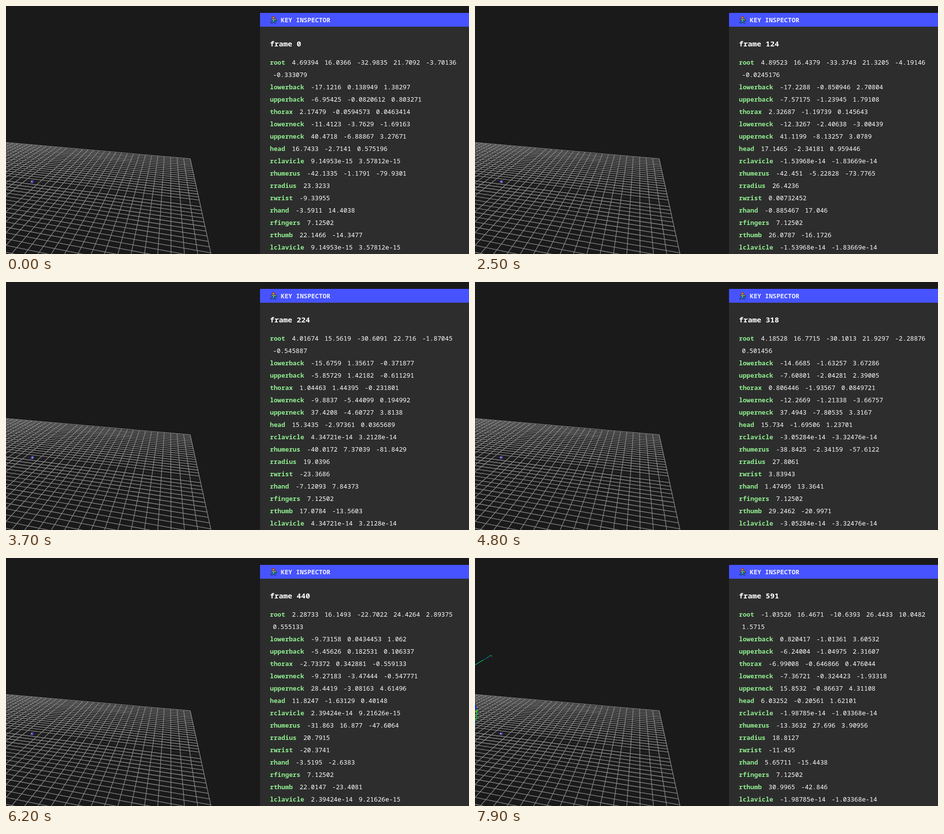
Write an HTML page that moves like this. It is 935x503 px and loops after 8 s.

```html
<!DOCTYPE html>
<html lang="en">
<head>
<meta charset="utf-8">
<title>Key inspector</title>
<style>
  html, body { margin: 0; width: 100%; height: 100%; overflow: hidden; background: #1a1a1a; }
  svg { display: block; width: 935px; height: 503px; }
  text { font-family: "Noto Sans Mono", "DejaVu Sans Mono", monospace; font-size: 12.8px; fill: #fff; }
  .name { font-weight: 700; fill: #90ee90; }
  .title { font-weight: 700; fill: #f0f0ff; }
  #counter { font-size: 15px; font-weight: 600; }
</style>
</head>
<body>
<svg viewBox="0 0 935 503">
  <rect width="935" height="503" fill="#1a1a1a"/>
  <g id="grid" fill="none" stroke-width="1.3"></g>

  <g transform="translate(53 356.3)">
    <circle r="2.7" fill="#6a60e0"/>
    <circle id="shade" r="1.4" fill="#3228b4"/>
    <circle id="glint" r="1.1"/>
  </g>

  <g id="figure" fill="none" stroke-width="1.3" stroke-linejoin="round">
    <path d="M-40 240L8 212" stroke="#00b48c"/>
    <path d="M8 212L17 207" stroke="#00d250"/>
    <path d="M17 207L25 202.5" stroke="#0064a0"/>
    <path d="M25 202.5L32 197L35 201" stroke="#14b48c" stroke-dasharray="3 1.5"/>
    <path d="M-1 296L3 307" stroke="#1414ff" stroke-width="2"/>
    <path d="M3 307L3.5 314L1.5 330" stroke="#00d23c" stroke-width="1.8"/>
    <path d="M1.5 330L0 345L-1 358" stroke="#145aa0"/>
    <path d="M-4 361L7 361" stroke="#28466e"/>
    <circle cx="3" cy="311" r="1.7" fill="#3ce628"/>
  </g>

  <rect x="513" y="14" width="422" height="489" fill="#2d2d2d"/>
  <rect x="513" y="14" width="422" height="28" fill="#4653ff"/>
  <g fill="none" stroke-linecap="round" stroke-linejoin="round">
    <path d="M541 26L540 30L543.5 31.5L544 34M540 30L539 33L535.5 33.5M540.5 26.5L536.5 27.5M541 26.5L545.5 28.5" stroke="#111" stroke-width="3.2"/>
    <path d="M540 30L543.5 31.5L544 34M540 30L539 33L535.5 33.5" stroke="#2896e6" stroke-width="1.7"/>
    <path d="M540.5 26.5L536.5 27.5M541 26.5L545.5 28.5" stroke="#f0b450" stroke-width="1.4"/>
    <path d="M541 26L540 30" stroke="#32c8c8" stroke-width="2.6"/>
    <circle cx="540" cy="23.5" r="2.5" fill="#f0a050" stroke="#111" stroke-width=".9"/>
    <path d="M538 22.4Q540.5 20.4 542.5 23" stroke="#a0461e" stroke-width="1.7"/>
  </g>
  <text class="title" x="555" y="33">KEY INSPECTOR</text>
  <text id="counter" x="533" y="82"></text>
  <g id="rows"></g>
</svg>
<script>
const LOOP = 8000, STEP = 100, PLAY = 900, END = 7900, LAST_COUNT = 591;
const LEFT = 533, CHAR = 7.68, MARGIN = 6, RIGHT = 918, LINE = 25;
const $ = id => document.getElementById(id);

// Each bone moves from its first pose to its last, with a swing in between.
const bones = [];
const bone = (name, from, to = from, swing = 2) => bones.push({ name, from, to, swing });

bone('root', [4.69394, 16.0366, -32.9835, 21.7092, -3.70136, -0.333079],
  [-1.03526, 16.4671, -10.6393, 26.4433, 10.0482, 1.5715], 1);
bone('lowerback', [-17.1216, 0.138949, 1.38297], [0.820417, -1.01361, 3.60532]);
bone('upperback', [-6.95425, -0.0820612, 0.803271], [-6.24004, -1.04975, 2.31607]);
bone('thorax', [2.17479, -0.0594573, 0.0463414], [-6.99008, -0.646866, 0.476044]);
bone('lowerneck', [-11.4123, -3.7629, -1.69163], [-7.36721, -0.324423, -1.93318]);
bone('upperneck', [40.4718, -6.88867, 3.27671], [15.8532, -0.86637, 4.31108]);
bone('head', [16.7433, -2.7141, 0.575196], [6.03252, -0.20561, 1.62101], 1);
bone('rclavicle', [9.14953e-15, 3.57812e-15], [-1.98785e-14, -1.03368e-14], 4e-14);
bone('rhumerus', [-42.1335, -1.1791, -79.9301], [-13.3632, 27.696, 3.90956], 8);
bone('rradius', [23.3233], [18.8127], 8);
bone('rwrist', [-9.33955], [-11.455], 15);
bone('rhand', [-3.5911, 14.4038], [5.65711, -15.4438], 6);
bone('rfingers', [7.12502], [7.12502], 0);
bone('rthumb', [22.1466, -14.3477], [30.9965, -42.846], 6);
bones.push({ ...bones.find(b => b.name === 'rclavicle'), name: 'lclavicle' });

const mix = (a, b, k) => a * (1 - k) + b * k;
const format = v => String(Number(v.toPrecision(6)));

function pose({ from, to, swing }, k) {
  return from.map((v, n) => {
    const wave = Math.sin(Math.PI * k) * Math.sin(Math.PI * 6 * k + v + n);
    return mix(v, to[n], k ** 3) + swing * wave;
  });
}

// Ground plane: a corner, two vanishing points and a weight per cell.
const corner = [372, 310], vanishLeft = [-1725, 124], vanishBack = [331.5, 124];
const CELLS = 40, MIDDLE = CELLS / 2;
const colWeight = 0.1283 / MIDDLE, rowWeight = 0.3266 / MIDDLE;

function project(col, row) {
  const a = col * colWeight, b = row * rowWeight;
  return corner.map((c, n) =>
    ((c + a * vanishLeft[n] - b * vanishBack[n]) / (1 + a - b)).toFixed(2));
}

function drawGrid() {
  const bright = [], dark = [];
  for (let n = 0; n <= CELLS; n++) {
    (n === MIDDLE ? dark : bright).push(
      `M${project(n, 0)}L${project(n, CELLS)}`, `M${project(0, n)}L${project(CELLS, n)}`);
  }
  $('grid').innerHTML = `<path d="${dark.join('')}" stroke="#302c34"/>` +
    `<path d="${bright.join('')}" stroke="#888"/>`;
}

function drawRows(k) {
  let y = 119, out = '';
  for (const b of bones) {
    out += `<text class="name" x="${LEFT}" y="${y}">${b.name}</text>`;
    let x = LEFT + (b.name.length + 1) * CHAR + MARGIN;
    for (const label of pose(b, k).map(format)) {
      const width = label.length * CHAR;
      if (x + width > RIGHT) {
        x = LEFT + MARGIN;
        y += LINE;
      }
      out += `<text x="${x.toFixed(2)}" y="${y}">${label}</text>`;
      x += width + 2 * MARGIN;
    }
    y += LINE;
  }
  $('rows').innerHTML = out;
}

function orbit(el, angle, radius) {
  el.setAttribute('cx', radius * Math.cos(angle));
  el.setAttribute('cy', radius * Math.sin(angle));
}

function draw(t) {
  const k = Math.max(0, (t - PLAY) / (END - PLAY));
  $('counter').textContent = 'frame ' + Math.round(LAST_COUNT * k ** 1.06);
  drawRows(k);

  const turn = t / 330;
  orbit($('shade'), turn, 1.4);
  orbit($('glint'), turn * 1.3 + 3.6, 1.5);
  $('glint').setAttribute('fill', `hsl(${240 + 60 * Math.sin(turn)} 80% 82%)`);

  const slide = (t - END) / 700 * 38;
  $('figure').setAttribute('transform', `translate(${slide.toFixed(2)} 0)`);
  $('figure').setAttribute('visibility', t >= 7300 ? 'visible' : 'hidden');
}

const start = performance.now();
let shown = -1;
function tick() {
  const t = Math.floor(((performance.now() - start) % LOOP) / STEP) * STEP;
  if (t !== shown) draw(shown = t);
  requestAnimationFrame(tick);
}
drawGrid();
tick();
</script>
</body>
</html>
```
